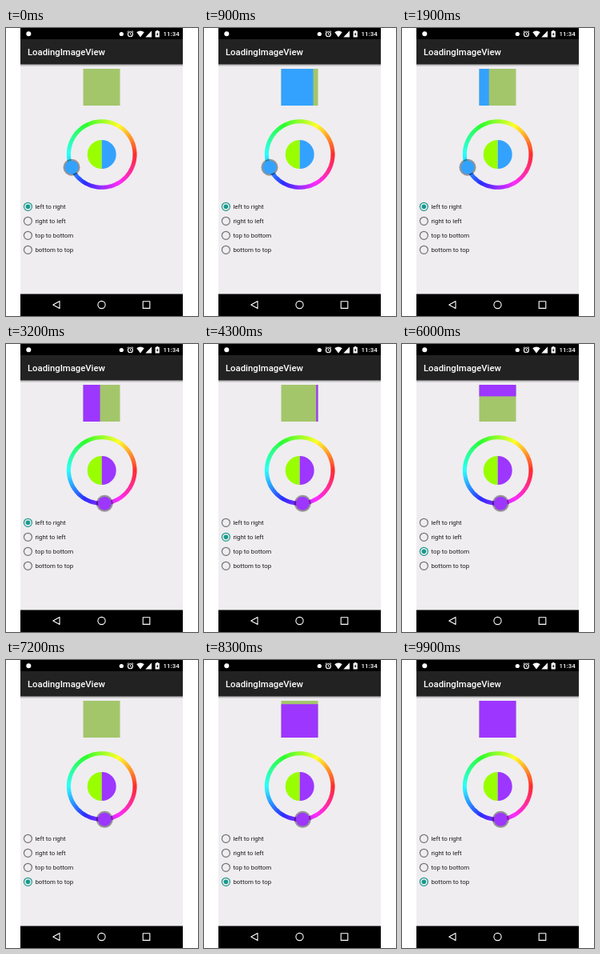
Recreate the animation shown at these times as an HTML page. Size 240 px wide and 360 px high, loop 10 s.

```html
<!DOCTYPE html>
<html lang="en">
<head>
<meta charset="utf-8">
<title>Loading image view</title>
<style>
  html, body { margin: 0; width: 100%; height: 100%; overflow: hidden; background: #fff; }
  svg { display: block; width: 240px; height: 360px; }
  text { font-family: Roboto, "Open Sans", sans-serif; }
  .label { font-size: 7.9px; fill: #1c1c1c; }
  .title { font-size: 11.3px; font-weight: 500; fill: #fff; }
  .clock { font-size: 7.9px; font-weight: 500; fill: #fff; }
  .line { fill: none; stroke: #fff; stroke-width: 1.1; }
</style>
</head>
<body>
<svg viewBox="0 0 240 360">
  <defs>
    <linearGradient id="shade" x2="0" y2="1">
      <stop offset="0" stop-color="#000" stop-opacity=".3"/>
      <stop offset="1" stop-color="#000" stop-opacity="0"/>
    </linearGradient>
  </defs>
  <rect x="18" width="203" height="360" fill="#efedf0"/>
  <rect x="18" width="203" height="14" fill="#000"/>
  <rect x="18" y="14" width="203" height="31.5" fill="#222"/>
  <rect x="18" y="45.5" width="203" height="3" fill="url(#shade)"/>
  <rect x="18" y="332.5" width="203" height="27.5" fill="#000"/>
  <text class="title" x="27" y="34.2">LoadingImageView</text>

  <!-- status bar -->
  <g fill="#fff">
    <circle cx="28.3" cy="7.3" r="3"/>
    <circle cx="144.3" cy="7.5" r="2.6"/>
    <path d="M163.3 5.2Q168 2 172.7 5.2L168 11.4Z"/>
    <path d="M174.3 11.4H182V3.6Z"/>
    <path d="M188 3h2.4v1h1.4v7.6h-5.2V4h1.4Z"/>
  </g>
  <path d="M189.7 5.2L187.8 8.2H189L188.7 10.3L190.6 7.3H189.4Z" fill="#000"/>
  <g class="line">
    <circle cx="155.4" cy="7.8" r="3"/>
    <path d="M155.4 6v2l1.3.8M151.6 5l1.8-1.5M159.2 5l-1.8-1.5" stroke-width=".9"/>
  </g>
  <text class="clock" x="196.6" y="10.4">11:34</text>

  <!-- loading image -->
  <rect x="96.5" y="51" width="46" height="46" fill="#a3c66b"/>
  <rect id="fill"/>

  <!-- colour wheel -->
  <g id="ring" fill="none" stroke-width="5"></g>
  <path d="M119.7 140a18 18 0 0 0 0 36Z" fill="#9f0"/>
  <path id="chosen" d="M119.7 140a18 18 0 0 1 0 36Z"/>
  <g id="knob">
    <circle r="10.5" fill="#000" fill-opacity=".38"/>
    <circle id="knobColor" r="8.4"/>
  </g>

  <g id="radios"></g>

  <!-- navigation bar -->
  <g class="line" stroke-linejoin="round">
    <path d="M58.8 346L67 341.4V350.6Z"/>
    <circle cx="119.5" cy="346" r="4.6"/>
    <rect x="171.2" y="341.8" width="8.6" height="8.6"/>
  </g>
</svg>
<script>
const LOOP = 10000, DURATION = 1500;
const BLUE = '#33a2ff', PURPLE = '#9d36ff';
const RECOLOR_AT = 2484;
const LABELS = ['left to right', 'right to left', 'top to bottom', 'bottom to top'];
const BOX = { x: 96.5, y: 51, size: 46 };
// The sweep covers the view, which is larger than the image inside it.
const VIEW = { x: 91.5, y: 46, size: 56 };
// Each sweep: start time and index of its direction.
const SWEEPS = [[-160, 0], [1340, 0], [RECOLOR_AT, 0], [3950, 1], [5400, 2], [6930, 2], [7200, 3], [8690, 3]];

const byId = id => document.getElementById(id);
const set = (el, attrs) => {
  for (const name in attrs) el.setAttribute(name, attrs[name]);
  return el;
};
const add = (parent, tag, attrs) =>
  parent.appendChild(set(document.createElementNS('http://www.w3.org/2000/svg', tag), attrs));
const clamp = (v, lo, hi) => Math.min(hi, Math.max(lo, v));
const easeInOut = p => 0.5 - Math.cos(Math.PI * clamp(p, 0, 1)) / 2;

function wheelPoint(deg, r = 41.3) {
  const a = deg * Math.PI / 180;
  return [119.7 + r * Math.cos(a), 158 + r * Math.sin(a)].map(v => v.toFixed(2));
}

for (let deg = 0; deg < 360; deg += 3) {
  add(byId('ring'), 'path', {
    d: `M${wheelPoint(deg)}A41.3 41.3 0 0 1 ${wheelPoint(deg + 3.6)}`,
    stroke: `hsl(${360 - deg - 1.5},100%,58%)`
  });
}

const radios = LABELS.map((label, i) => {
  const g = byId('radios'), cx = 27.4, cy = 223.3 + 18 * i;
  const ring = add(g, 'circle', { cx, cy, r: 5, fill: 'none', 'stroke-width': 1.2 });
  const dot = add(g, 'circle', { cx, cy, r: 2.8, fill: '#1a9a8c' });
  add(g, 'text', { class: 'label', x: 36.4, y: cy + 2.8 }).textContent = label;
  return { ring, dot };
});

function fillRect(direction, progress) {
  const reach = VIEW.size * progress;
  const vertical = direction > 1, reversed = direction % 2;
  const axis = vertical ? 'y' : 'x';
  const from = VIEW[axis] + (reversed ? VIEW.size - reach : 0);
  const lo = BOX[axis], hi = lo + BOX.size;
  const a = clamp(from, lo, hi), b = clamp(from + reach, lo, hi);
  return vertical
    ? { x: BOX.x, y: a, width: BOX.size, height: b - a }
    : { x: a, y: BOX.y, width: b - a, height: BOX.size };
}

function render(t) {
  const [start, direction] = SWEEPS.filter(s => s[0] <= t).pop();
  const recolored = t >= RECOLOR_AT;
  const fill = recolored ? PURPLE : BLUE;
  const [x, y] = recolored ? [123.3, 199.3] : [82, 174.2];

  set(byId('fill'), { ...fillRect(direction, easeInOut((t - start) / DURATION)), fill });
  set(byId('chosen'), { fill });
  set(byId('knobColor'), { fill });
  set(byId('knob'), { transform: `translate(${x} ${y})` });
  radios.forEach(({ ring, dot }, i) => {
    const on = i === direction;
    set(ring, { stroke: on ? '#1a9a8c' : '#737373' });
    set(dot, { visibility: on ? 'visible' : 'hidden' });
  });
}

const began = performance.now();
function tick() {
  render((performance.now() - began) % LOOP);
  requestAnimationFrame(tick);
}
tick();
</script>
</body>
</html>
```
